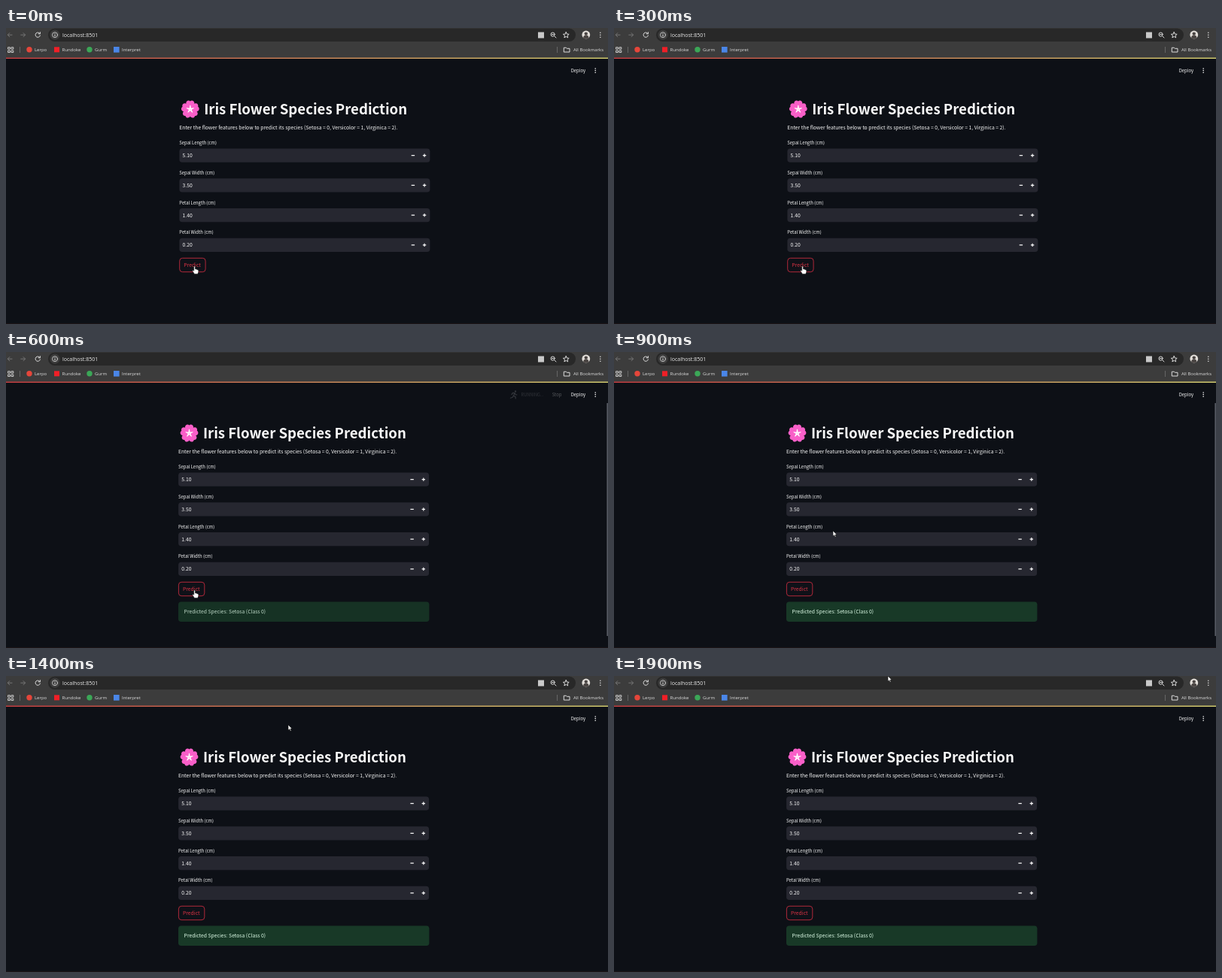
Animation, 800 px wide and 394 px high, one loop 2 s. Source, as an HTML page:

```html
<!DOCTYPE html>
<html lang="en">
<head>
<meta charset="utf-8">
<title>Iris Flower Species Prediction</title>
<style>
  html, body { margin: 0; width: 100%; height: 100%; overflow: hidden; background: #0d1016; }
  svg { display: block; width: 100vw; height: 100vh; }
  text { white-space: pre; }
  .ui { font-family: "Open Sans", "Noto Sans", sans-serif; fill: #dedede; font-size: 6px; }
  .app { font-family: "Noto Sans CJK JP", "Noto Sans CJK SC", "Noto Sans CJK", "Noto Sans", sans-serif; fill: #fafafa; font-size: 6.78px; }
  .app .small { font-size: 5.93px; }
  .line { fill: none; stroke: #dcdcdc; stroke-linecap: round; stroke-linejoin: round; }
  .dim { stroke: #747474; }
</style>
</head>
<body>
<svg viewBox="0 0 800 394" preserveAspectRatio="none">
  <defs>
    <linearGradient id="stripe">
      <stop offset="0" stop-color="#e8484b"/>
      <stop offset="1" stop-color="#f5ee80"/>
    </linearGradient>
    <path id="petal" d="M0 0C-3.2 -2-6.6 -6.4-5.2 -9.6C-4.2 -11.8-1.8 -12.2 0 -10.8C1.8 -12.2 4.2 -11.8 5.2 -9.6C6.6 -6.4 3.2 -2 0 0Z"/>
    <path id="ray" d="M-1.2 0L-.6 -4.6L0 -5.6L.6 -4.6L1.2 0Z"/>
  </defs>
  <rect width="800" height="394" fill="#0d1016"/>
  <rect y="393" width="800" height="1" fill="#1b1416"/>

  <g class="ui">
    <rect width="800" height="39.5" fill="#3c3c3c"/>
    <rect x="56" y=".5" width="701" height="17.5" rx="8.75" fill="#282828"/>
    <path class="line dim" d="M8 9.2H2.4M4.8 6.6L2.2 9.2L4.8 11.8M19.8 9.2H25.4M23 6.6L25.6 9.2L23 11.8"/>
    <path class="line" d="M45 7.4A3.2 3.2 0 1 0 45.4 10M45.4 5.6V7.8H43.2"/>
    <circle cx="65" cy="9.2" r="6.6" fill="#3c3c3c"/>
    <circle class="line" cx="65" cy="9.2" r="3.5" stroke-width=".8"/>
    <path class="line" d="M65 9V11M65 7.3V7.4"/>
    <text x="75" y="11.7" font-size="7" fill="#e8e8e8">localhost:8501</text>

    <rect x="707" y="5.5" width="8" height="8" fill="#c9c9c9"/>
    <circle class="line" cx="726.6" cy="8.6" r="2.6"/>
    <path class="line" d="M728.6 10.6L731 13M725.4 8.6H727.8"/>
    <path class="line" d="M744.3 5.4L745.4 8L748.2 8.3L746.1 10.1L746.7 12.9L744.3 11.4L741.9 12.9L742.5 10.1L740.4 8.3L743.2 8Z"/>
    <circle cx="770.8" cy="9" r="5.4" fill="#e2ded9"/>
    <path d="M767.2 13C767.2 10.3 769 9.6 770.8 9.6S774.4 10.3 774.4 13A5.4 5.4 0 0 1 767.2 13Z" fill="#4a4543"/>
    <circle cx="770.8" cy="7.6" r="2.2" fill="#4a4543"/>
    <g fill="#e4e4e4">
      <circle cx="789.8" cy="6.2" r=".8"/><circle cx="789.8" cy="9.2" r=".8"/><circle cx="789.8" cy="12.2" r=".8"/>
    </g>

    <path class="line" stroke-width=".9" d="M3 25.7H5.4V28.1H3ZM7.4 25.7H9.8V28.1H7.4ZM3 30.1H5.4V32.5H3ZM7.4 30.1H9.8V32.5H7.4Z"/>
    <path d="M18.5 25V33M732.5 25V33" stroke="#666"/>
    <circle cx="31" cy="28.8" r="3.7" fill="#e5463a"/>
    <rect x="64" y="25.3" width="7" height="7" fill="#f01f27"/>
    <circle cx="111" cy="28.8" r="3.7" fill="#3ba757"/>
    <rect x="143" y="25" width="7.6" height="7.6" fill="#4a86e8"/>
    <text x="38" y="31">Lerpo</text>
    <text x="74.5" y="31">Rundoke</text>
    <text x="118" y="31">Gurm</text>
    <text x="154" y="31">Interpret</text>
    <path class="line" d="M741.7 26.2H744.4L745.4 27.3H749V32H741.7Z"/>
    <text x="754" y="31">All Bookmarks</text>
  </g>
  <rect y="39.5" width="800" height="1.3" fill="url(#stripe)"/>

  <g class="app">
    <text class="small" x="750.7" y="58.7">Deploy</text>
    <circle cx="783.2" cy="54" r=".8"/><circle cx="783.2" cy="56.6" r=".8"/><circle cx="783.2" cy="59.2" r=".8"/>
    <g id="status">
      <g fill="none" stroke="#8b8d92" stroke-width="1.2" stroke-linecap="round" stroke-linejoin="round">
        <path d="M676 55L674.3 58.2L677 59.6L677.2 62M674.3 58.2L673.2 60.2L670.4 61.2M672 56.6L673.4 54.4L676 54.6L677 56.6L679 57"/>
        <circle cx="677" cy="52.4" r=".6"/>
      </g>
      <text x="684.6" y="58.7" font-size="5.6" fill="#85878c">RUNNING...</text>
      <text class="small" x="725.7" y="58.8">Stop</text>
    </g>

    <g id="page">
      <g id="flower"></g>
      <text x="263.2" y="114.6" font-size="18.6" font-weight="700">Iris Flower Species Prediction</text>
      <text x="230.3" y="135.4">Enter the flower features below to predict its species (Setosa = 0, Versicolor = 1, Virginica = 2).</text>
      <g id="fields"></g>
      <rect x="230.7" y="306.3" width="34.4" height="18.4" rx="3.8" fill="#0f1118" stroke="#c22c3f" stroke-width=".9"/>
      <text x="236.3" y="317.9" fill="#dc3344">Predict</text>
    </g>

    <g id="result">
      <rect x="229" y="332.5" width="333.4" height="26.5" rx="3.8" fill="#183927"/>
      <text x="236.6" y="348.3" fill="#dffde9">Predicted Species: Setosa (Class 0)</text>
    </g>
  </g>
  <rect id="scroll" x="798.4" y="68" width="1.6" height="310" fill="#565a63"/>

  <g id="cursor" stroke="#111" stroke-width=".6" stroke-linejoin="round" fill="#fff">
    <path id="hand" d="M-.9 .8C-.9 -.4 .9 -.4 .9 .8V4C1.5 3.4 2.4 3.6 2.5 4.4C3.1 3.9 4 4.2 4 5C4.6 4.7 5.2 5.1 5.2 5.8V7.6C5.2 9 4.3 9.4 4.2 10.4H-.4C-.6 9.2 -1.8 8.3 -2.6 6.7C-3.1 5.7 -1.9 5.1 -.9 6.2Z"/>
    <path id="arrow" d="M0 0V7.2L1.7 5.7L2.9 8.3L4.1 7.8L2.9 5.2L5.1 5.1Z"/>
  </g>
</svg>
<script>
const LOOP = 2000, STEP = 100;
const $ = id => document.getElementById(id);
const show = (id, opacity) => $(id).setAttribute("opacity", opacity);
const shift = (x, y) => `matrix(1 0 0 1 ${x} ${y})`;
const place = (id, x, y) => $(id).setAttribute("transform", shift(x, y));

const FIELDS = [["Sepal Length", "5.10"], ["Sepal Width", "3.50"], ["Petal Length", "1.40"], ["Petal Width", "0.20"]];

$("fields").innerHTML = FIELDS.map(([label, value], i) => `
  <g transform="${shift(0, i * 39.75)}">
    <text class="small" x="230.3" y="155">${label} (cm)</text>
    <rect x="230.4" y="160.4" width="333" height="18.4" rx="3.8" fill="#262730"/>
    <text x="234.6" y="172.2">${value}</text>
    <path d="M538.7 169.6H543.1M553.9 169.6H558.3M556.1 167.4V171.8" stroke="#fafafa" stroke-width="1.2"/>
  </g>`).join("");

const ring = (id, fill) => [0, 1, 2, 3, 4]
  .map(i => `<use href="#${id}" fill="${fill}" transform="rotate(${i * 72})"/>`).join("");
$("flower").innerHTML = ring("petal", "#f95fc8") +
  '<circle r="3" fill="#f95fc8"/>' + ring("ray", "#fff") +
  '<circle r="1.9" fill="#fff"/><circle r=".8" fill="#f7b6df"/>';
place("flower", 244.8, 108.2);

// time, x, y, easing power towards the next point
const PATH = [[600, 250.6, 317, 1.25], [900, 291, 238, 1], [1400, 375, 65, 1], [1900, 364, 0, 1]];

function pointer(t) {
  if (t <= PATH[0][0]) return PATH[0].slice(1, 3);
  const i = PATH.findIndex(p => p[0] >= t);
  const [t0, x0, y0, power] = PATH[i - 1], [t1, x1, y1] = PATH[i];
  const u = ((t - t0) / (t1 - t0)) ** power;
  return [x0 + (x1 - x0) * u, y0 + (y1 - y0) * u];
}

function draw(ms) {
  const t = Math.floor((ms % LOOP) / STEP) * STEP;
  const [x, y] = pointer(t);
  const onButton = y > 306;
  place("page", t < 500 ? 0 : -1.3, 0);
  show("status", t === 500 ? 0.9 : t === 600 ? 0.3 : 0);
  show("result", t < 600 ? 0 : t === 600 ? 0.85 : 1);
  show("scroll", t >= 500 && t < 1300 ? 1 : 0);
  show("hand", onButton ? 1 : 0);
  show("arrow", onButton ? 0 : 1);
  place("cursor", x, y);
}

const start = performance.now();
function tick() {
  draw(performance.now() - start);
  requestAnimationFrame(tick);
}
tick();
</script>
</body>
</html>
```
